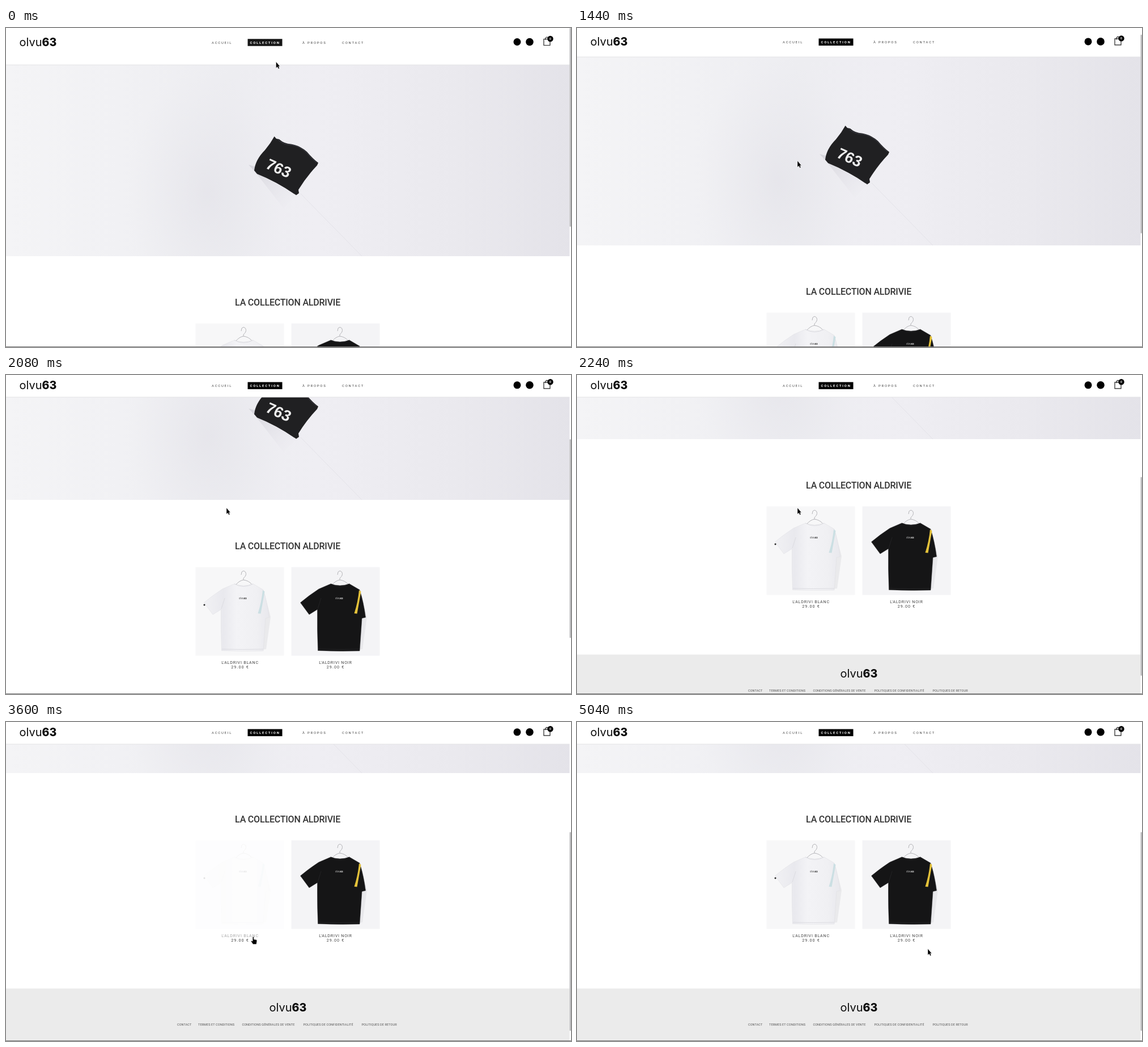
Animation, 997 px wide and 562 px high, one loop 5200 ms. Source, as an HTML page:

```html
<!DOCTYPE html>
<html lang="fr">
<head>
<meta charset="utf-8">
<style>
  html, body { margin: 0; width: 100%; height: 100%; overflow: hidden; background: #fff; }
  svg { display: block; width: 997px; height: 562px; font-family: Roboto, sans-serif; }
  .nav { font-size: 6px; letter-spacing: 1.75px; fill: #444; }
  .title { font-size: 16px; font-weight: 500; letter-spacing: -.2px; fill: #333; }
  .name { font-size: 7.2px; letter-spacing: .75px; fill: #444; }
  .price { font-size: 7.2px; letter-spacing: 1.1px; fill: #444; }
  .link { font-size: 5.5px; letter-spacing: .1px; fill: #555; }
  .logo { font: 20px Inter, sans-serif; fill: #0c0c0c; }
  .logo tspan { font-weight: 800; font-size: 19.5px; }
  .mid { text-anchor: middle; }
</style>
</head>
<body>
<svg viewBox="0 0 997 562">
  <defs>
    <linearGradient id="cloth">
      <stop offset="0" stop-color="#f4f4f6"/>
      <stop offset=".2" stop-color="#f1f1f4"/>
      <stop offset=".4" stop-color="#ededf1"/>
      <stop offset=".55" stop-color="#efeef3"/>
      <stop offset=".8" stop-color="#eae9ee"/>
      <stop offset="1" stop-color="#e4e3e9"/>
    </linearGradient>
    <radialGradient id="shade">
      <stop offset="0" stop-color="#dfdee5" stop-opacity=".5"/>
      <stop offset="1" stop-color="#e4e3e9" stop-opacity="0"/>
    </radialGradient>
    <linearGradient id="fold" x1="0" y1="0" x2="1" y2="1">
      <stop offset="0" stop-color="#d5d4db"/>
      <stop offset="1" stop-color="#e9e8ee" stop-opacity="0"/>
    </linearGradient>
    <linearGradient id="white-cloth">
      <stop offset="0" stop-color="#f1f1f4"/>
      <stop offset=".3" stop-color="#e9e9ee"/>
      <stop offset=".5" stop-color="#f3f3f6"/>
      <stop offset=".8" stop-color="#f0f0f3"/>
      <stop offset="1" stop-color="#e8e8ed"/>
    </linearGradient>
    <clipPath id="heroClip"><path d="M0 65H995V402H0z"/></clipPath>
  </defs>

  <g id="page">
    <g clip-path="url(#heroClip)">
      <path fill="url(#cloth)" d="M0 65H995V402H0z"/>
      <ellipse cx="355" cy="290" rx="140" ry="220" fill="url(#shade)"/>
      <path fill="none" stroke="#e3e2e8" d="M520 292L628 402"/>
      <path fill="url(#fold)" d="M440 254L513 294L490 318zM428 241l14 4v11z"/>
      <path fill="#202022" d="M473.500 191L477 195L482 196Q491 204 503 204.500Q518 207 531 218Q541 230 551 237.500L549 242Q530 262 516 285L517 291L512 294.500Q478 271 443 257L438 251Q440 232 457 215Q467 203 473.500 191z"/>
      <path fill="none" stroke="#3c3d46" d="M480 197q10 9 23 9q15 2 27 13q9 11 18 18"/>
      <text class="mid" transform="translate(481.500 246.500) rotate(24) skewX(-3)" y="10" font-family="Liberation Sans, sans-serif" font-size="27" font-weight="700" fill="#eee">763</text>
    </g>
    <text class="title mid" x="497" y="489">LA COLLECTION ALDRIVIE</text>
    <g id="products" transform="translate(0 312)"></g>
    <path fill="#ebebeb" d="M0 781.5H995V880H0z"/>
    <text class="logo" x="464.5" y="822">olvu<tspan>63</tspan></text>
    <g id="links" class="link"></g>
  </g>

  <path id="bar" fill="#fff"/>
  <path id="edge" stroke="#e3e3e5" d="M0 0H995"/>
  <g id="header">
    <text class="logo" x="23.5" y="32">olvu<tspan>63</tspan></text>
    <path id="button" d="M426.500 19.200H487.500V31.700H426.500z"/>
    <g class="nav">
      <text x="363" y="27.700">ACCUEIL</text>
      <text x="430.500" y="27.700" font-weight="700" fill="#fff">COLLECTION</text>
      <text x="523" y="27.700">À PROPOS</text>
      <text x="593" y="27.700">CONTACT</text>
    </g>
    <circle cx="902" cy="24.500" r="6.500"/>
    <circle cx="924" cy="24.500" r="6.800"/>
    <path fill="none" stroke="#222" stroke-width="1.200" d="M949 19.500H960V30.500H949zM952 21V18q2.500 -4 5 0V21"/>
    <circle cx="960.500" cy="19" r="5.200"/>
    <text class="mid" x="960.500" y="20.800" font-size="5" font-weight="700" fill="#fff">0</text>
  </g>

  <path fill="#fff" d="M994.500 0H997V562H994.500z"/>
  <rect id="thumb" x="994.500" width="2.500" height="350" rx="1" fill="#bcbcbe"/>
  <path fill="#777" d="M0 561H997V562H0z"/>
  <g id="cursor" stroke="#fff" stroke-width=".4">
    <path id="arrow" d="M0 0V11L2.500 8.900L4.200 12.400L6 11.600L4.400 8.200H7z"/>
    <path id="hand" d="M.2 1Q1.300 -.4 2.300 1V5L6.500 5.500Q8 6 7.700 8L6.800 13.500H.8Q-.5 11 -2.600 8.500Q-2.800 6.500 .2 8.200z"/>
  </g>
</svg>
<script>
const $ = id => document.getElementById(id);

const shirt = 'M573 238Q589 244 606 238L624 248.5Q631 270 634.500 297L628 298.500L624 356Q588 357 550.5 355.5Q549 318 549.500 283L535 292L519.500 271Q535 258 552 247z';
const hanger = 'M575 240Q582 232 589 231Q598 232 604 239M589 231V228Q595 223 593 218Q590 213 586 217L585 222';

function product(id, dx, boxX, look, label, mid) {
  return `<g id="${id}">
    <rect x="${boxX}" y="208.5" width="156" height="156" fill="${look.back}"/>
    <g transform="translate(${dx})">
      <path d="M624 249L637 296L629 353L620 354z" fill="#dedee2" opacity=".5"/>
      <path d="${hanger}" fill="none" stroke="#b5b5b9"/>
      <path d="${shirt}" fill="${look.fill}" stroke="${look.line}" stroke-width=".5"/>
      <path d="M573 238Q589 247 606 238M550 282L556 263M551 353Q588 354 624 353" fill="none" stroke="${look.line}"/>
      <path d="M623 249L626.500 251.5L619.500 290.5L614.500 290Q621 270 623 249z" fill="${look.stripe}"/>
      ${look.dot}
      <text class="logo" transform="translate(581 265.300) scale(.21)" style="fill:${look.ink}">olvu<tspan>63</tspan></text>
    </g></g>
    <text id="${id}Name" class="name mid" x="${mid}" y="378.500">${label}</text>
    <text class="price mid" x="${mid}" y="386.800">29.00 €</text>`;
}

$('products').innerHTML =
  product('white', -170, 334.5, { back: '#f7f7f8', fill: 'url(#white-cloth)', line: '#dcdce1', stripe: '#cbdfe3', ink: '#333',
    dot: '<circle cx="520" cy="275" r="1.500" fill="#222"/>' }, "L'ALDRIVI BLANC", 413) +
  product('black', 0, 503.5, { back: '#f4f4f6', fill: '#151516', line: '#222224', stripe: '#e4c23a', ink: '#ddd', dot: '' },
    "L'ALDRIVI NOIR", 581.5);

$('links').innerHTML = [
  [302, 'CONTACT'], [339, 'TERMES ET CONDITIONS'], [416.5, 'CONDITIONS GÉNÉRALES DE VENTE'],
  [524.5, 'POLITIQUES DE CONFIDENTIALITÉ'], [627.5, 'POLITIQUES DE RETOUR']
].map(([x, label]) => `<text x="${x}" y="847">${label}</text>`).join('');

// Keys are [time, value] pairs; each span is linear or eased.
function track(t, keys, ease = p => p) {
  const i = keys.findIndex(k => k[0] > t);
  if (i < 0) return keys[keys.length - 1][1];
  if (i === 0) return keys[0][1];
  const [a, u] = keys[i - 1], [b, v] = keys[i];
  return u + (v - u) * ease((t - a) / (b - a));
}
const smooth = p => p * p * (3 - 2 * p);

const scrollKeys = [[1360, 0], [1440, 19], [1520, 70], [1600, 113], [1680, 140], [1760, 156], [1840, 165], [1920, 169], [1999, 169],
  [2000, 172], [2080, 182], [2160, 242], [2240, 289], [2320, 304], [2400, 310], [2480, 312]];
const heightKeys = [[1360, 65], [1440, 51], [1520, 42], [1600, 39]];
const liftKeys = [[1360, 0], [1440, -.6], [1520, -5], [1600, -6.7]];
const cursorX = [[0, 476.5], [560, 389], [3040, 389], [3600, 435], [3920, 441], [4240, 441], [4800, 619]];
const cursorY = [[0, 59.5], [560, 234], [3040, 234], [3600, 378], [3920, 398], [4240, 398], [4800, 399.5]];
const fadeKeys = [[3040, 1], [3600, .13], [3920, 1]];

function draw(now) {
  const t = Math.floor(now % 5200 / 80) * 80;
  const scroll = track(t, scrollKeys), height = track(t, heightKeys), fade = track(t, fadeKeys);
  const hover = t >= 3120 && t < 3760;

  $('page').setAttribute('transform', `translate(0 ${-scroll})`);
  $('bar').setAttribute('d', `M0 0H995V${height}H0z`);
  $('edge').setAttribute('transform', `translate(0 ${height})`);
  $('header').setAttribute('transform', `translate(0 ${track(t, liftKeys)})`);
  $('button').setAttribute('fill', t < 240 ? '#161616' : '#000');
  $('thumb').setAttribute('y', scroll * .622);
  $('white').setAttribute('opacity', fade);
  $('whiteName').setAttribute('opacity', .4 + .6 * fade);
  $('cursor').setAttribute('transform', `translate(${track(t, cursorX, smooth)} ${track(t, cursorY, smooth)})`);
  $('arrow').setAttribute('visibility', hover ? 'hidden' : 'visible');
  $('hand').setAttribute('visibility', hover ? 'visible' : 'hidden');
}

const start = performance.now();
(function loop() {
  draw(performance.now() - start);
  requestAnimationFrame(loop);
})();
</script>
</body>
</html>
```
